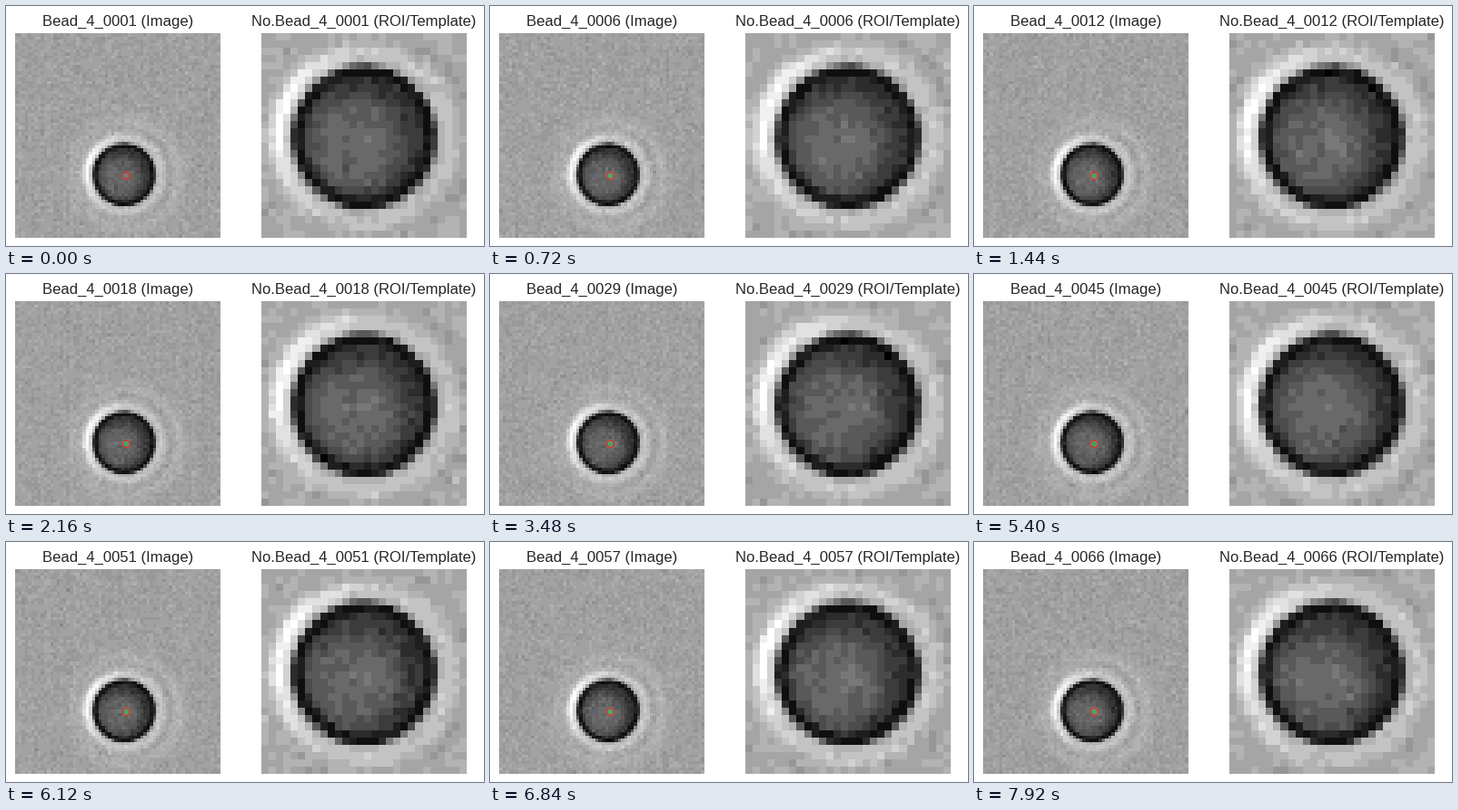
A matplotlib script that plays this animation: 526x265 px, repeating every 8 s.

```python
import matplotlib.pyplot as plt
import numpy as np
from matplotlib.animation import FuncAnimation

W, H, DPI = 526, 265, 100
STEP_MS, TICK_MS, LOOP_MS = 120, 40, 8000
FIELD, ROI = 64, 28           # cells along each side
MARK_X, MARK_Y = 34, 44       # cell in the middle of the region of interest
SIDE, TOP = 225.6, 30         # panel size and top edge in pixels

plt.rcParams["font.family"] = "Liberation Sans"


def ramp(v, start, width):
    t = np.clip((v - start) / width, 0, 1)
    return t * t * (3 - 2 * t)


def bump(v, centre, width):
    return np.exp(-((v - centre) / width) ** 2)


def bead(size, cx, cy):
    """Grey levels of the bead with its diffraction halo."""
    y, x = np.mgrid[:size, :size] + 0.5
    dx, dy = x - cx, y - cy
    r = np.hypot(dx, dy) + 1e-6
    ux, uy = dx / r, dy / r

    lit = np.clip(-0.95 * ux - 0.3 * uy, 0, 1) ** 2
    outside = 160 + bump(r, 11.6, 1.3) * (24 + 58 * lit)
    outside += 15 * bump(r, 13, 4.5) + 10 * bump(r, 17.3, 1.7) * (0.6 + 0.4 * ux)
    outside -= 15 * bump(r, 14.5, 1.1) * (0.6 + 0.4 * ux)

    shade = np.hypot(dx + 1.4, dy - 1.0)
    inside = 100 - 50 * ramp(shade, 3.5, 6) + 12 * bump(np.hypot(dx - 0.5, dy - 0.5), 0, 2)
    inside += (17 - inside) * ramp(r, 7.7, 1.3)
    return inside + (outside - inside) * ramp(r, 9.2, 1.2)


BASE = bead(FIELD, MARK_X, MARK_Y + 0.25)
FIXED = np.random.default_rng(4).normal(0, 3, (FIELD, FIELD))


def grain(n):
    rng = np.random.default_rng(100 + n)
    fresh = rng.normal(0, 5, (FIELD, FIELD))
    columns = rng.normal(0, 1.2, FIELD)
    return FIXED + fresh + columns


def tone(levels, step):
    return np.clip(np.round(levels / step) * step, 0, 255)


def panel(left, size):
    ax = fig.add_axes([left / W, 1 - (TOP + SIDE) / H, SIDE / W, SIDE / H])
    ax.axis("off")
    image = ax.imshow(np.zeros((size, size)), cmap="gray", vmin=0, vmax=255,
                      interpolation="nearest", aspect="auto")
    title = ax.set_title("", fontsize=12, color="#262626")
    return ax, image, title


def ring(ax, size, color):
    return ax.plot(MARK_X, MARK_Y, "o", ms=size, mfc="none", mec=color, mew=0.9)[0]


fig = plt.figure(figsize=(W / DPI, H / DPI), dpi=DPI, facecolor="white")
ax, field_image, field_title = panel(10, FIELD)
_, roi_image, roi_title = panel(281.3, ROI)
ring(ax, 5.8, "#e0392f")
found = ring(ax, 2.8, "#35c65a")


def update(tick):
    n = max(1, tick * TICK_MS // STEP_MS)
    levels = BASE + grain(n)
    top, left = MARK_Y - ROI // 2, MARK_X - ROI // 2
    field_image.set_data(tone(levels, 9))
    roi_image.set_data(tone(levels[top:top + ROI, left:left + ROI], 15))
    name = f"Bead_4_{n:04d}"
    field_title.set_text(f"{name} (Image)")
    roi_title.set_text(f"No.{name} (ROI/Template)")
    found.set_visible(n > 1)
    return field_image, roi_image, field_title, roi_title, found


anim = FuncAnimation(fig, update, frames=LOOP_MS // TICK_MS, interval=TICK_MS,
                     repeat=True, repeat_delay=0, blit=False)
plt.show()
```
